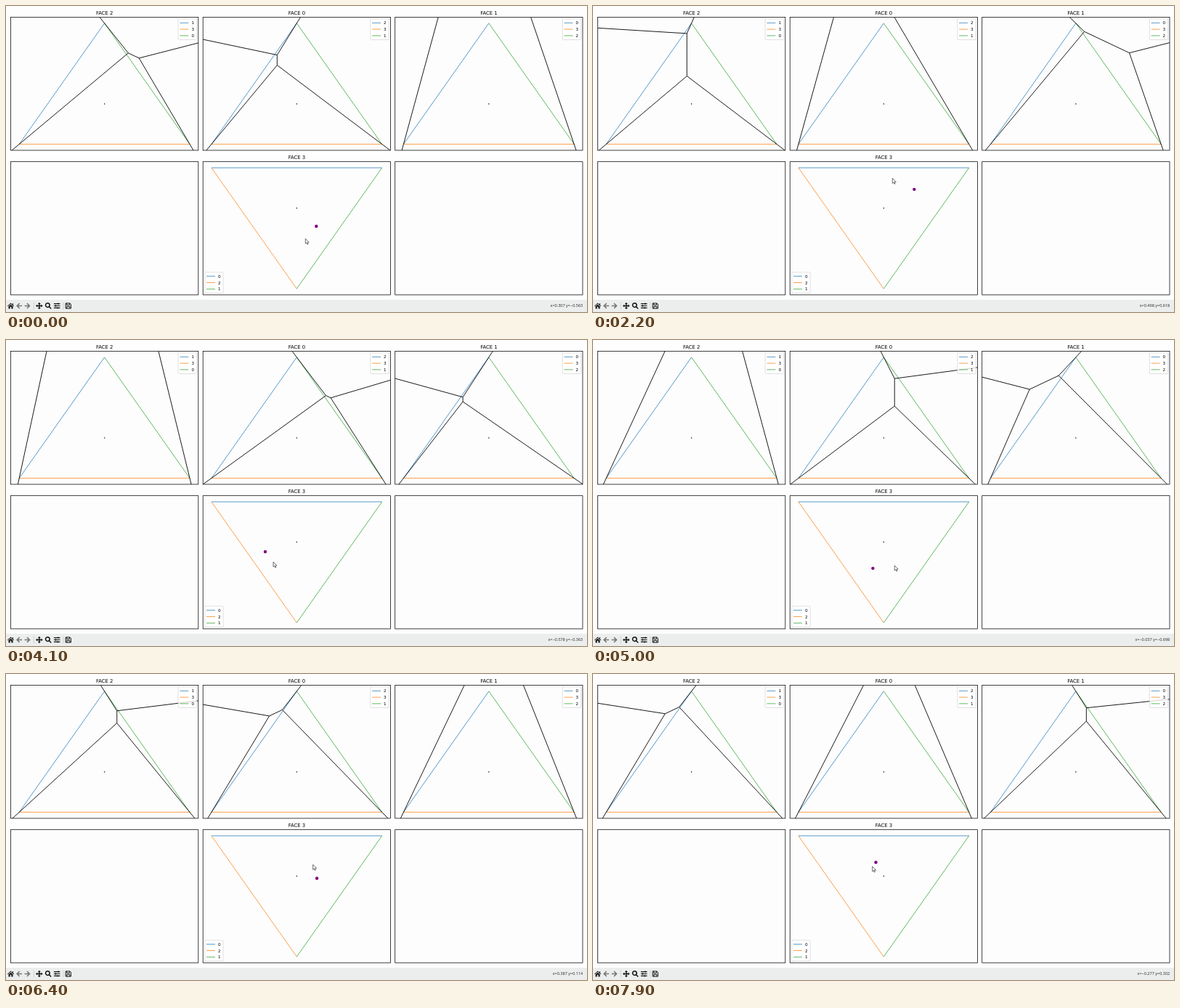
Animation, 800 px wide and 422 px high, one loop 8 s. Source, as an HTML page:

```html
<!DOCTYPE html>
<html lang="en">
<head>
<meta charset="utf-8">
<title>Cut locus on a tetrahedron</title>
<style>
html, body { margin: 0; width: 800px; height: 422px; overflow: hidden; background: #fefefe; }
svg { display: block; }
.title { font: 6.8px "DejaVu Sans", sans-serif; text-anchor: middle; }
.key { font: 5.6px "DejaVu Sans", sans-serif; }
.read { font: 5.5px "Open Sans", "Noto Sans", sans-serif; text-anchor: end; fill: #222; }
</style>
</head>
<body>
<svg id="stage" width="800" height="422" viewBox="0 0 800 422"></svg>
<script>
const LOOP = 8000, STEP = 50, READ_LAG = 200, MOUSE_LAG = 450;
const SX = 67.8, SY = 55.6, H = Math.sqrt(3);
const COLORS = ['#1f77b4', '#ff7f0e', '#2ca02c'];
const stage = document.getElementById('stage');

function add(tag, attrs, parent = stage, text) {
  const el = document.createElementNS('http://www.w3.org/2000/svg', tag);
  for (const k in attrs) el.setAttribute(k, attrs[k]);
  if (text !== undefined) el.textContent = text;
  parent.appendChild(el);
  return el;
}

// Pointer path: time, x, y in the units of the bottom face
const track = [
  [0, .398, -.45], [200, .307, -.563], [450, .177, -.757], [800, -.05, -.79],
  [1250, .214, -.63], [1450, .393, -.533], [1700, .664, .04],
  [2200, .62, .465], [2400, .498, .618], [2650, .177, .74],
  [3400, -.44, .555], [3600, -.602, .31], [3850, -.68, -.05],
  [5000, -.22, -.65], [5200, -.037, -.698], [5450, .22, -.58],
  [6400, .41, -.055], [6600, .387, .114], [6850, .33, .285],
  [7900, -.16, .34], [8100, -.277, .302], [8350, -.23, .24]
];
let turn = 0;
const polar = track.map(([t, x, y]) => {
  const a = Math.atan2(y, x);
  turn += Math.atan2(Math.sin(a - turn), Math.cos(a - turn));
  return [t, turn, Math.hypot(x, y)];
});

function slope(i, k) {
  const a = polar[Math.max(i - 1, 0)], b = polar[Math.min(i + 1, polar.length - 1)];
  return (b[k] - a[k]) / (b[0] - a[0]);
}

function pointAt(t) {
  let i = 0;
  while (i < polar.length - 2 && polar[i + 1][0] <= t) i++;
  const p = polar[i], q = polar[i + 1], d = q[0] - p[0];
  const u = Math.min((t - p[0]) / d, 1), v = 1 - u;
  const mix = k => p[k] * v * v * (1 + 2 * u) + q[k] * u * u * (3 - 2 * u)
    + d * u * v * (v * slope(i, k) - u * slope(i + 1, k));
  const a = mix(1), r = mix(2);
  return [r * Math.cos(a), r * Math.sin(a)];
}

// Unfolded copies of the dot as seen from a side face
function sites([px, py], rot) {
  const c = Math.cos(rot), s = Math.sin(rot);
  const x = px * c - py * s, y = px * s + py * c;
  const list = [[x, y - 2], [-2 * H - x, -y], [2 * H - x, -y]];
  const nearest = y > Math.abs(x) / H;
  if (!nearest) list.push([x + (x > 0 ? -2 : 2) * H, y + 4]);
  return list;
}

// Each bisector, cut by the half planes of the other sites
function voronoi(pts, cx, cy) {
  let d = '';
  pts.forEach(([ax, ay], i) => pts.slice(i + 1).forEach(([bx, by], n) => {
    const mx = (ax + bx) / 2, my = (ay + by) / 2;
    const len = Math.hypot(bx - ax, by - ay);
    const ux = (ay - by) / len, uy = (bx - ax) / len;
    let lo = -9, hi = 9;
    pts.forEach(([x, y], k) => {
      if (k === i || k === i + 1 + n) return;
      const gap = (x - mx) ** 2 + (y - my) ** 2 - (ax - mx) ** 2 - (ay - my) ** 2;
      const rate = 2 * ((x - mx) * ux + (y - my) * uy);
      if (rate > 0) hi = Math.min(hi, gap / rate);
      else if (rate < 0) lo = Math.max(lo, gap / rate);
      else if (gap < 0) hi = lo;
    });
    if (lo >= hi) return;
    const at = s => `${(cx + (mx + ux * s) * SX).toFixed(2)} ${(cy - (my + uy * s) * SY).toFixed(2)}`;
    d += `M${at(lo)}L${at(hi)}`;
  }));
  return d;
}

function axes(x, y) {
  add('rect', { x, y, width: 258.3, height: 183.5, fill: '#fdfdfe' });
}

function border(x, y) {
  add('rect', { x, y, width: 258.3, height: 183.5, fill: 'none', stroke: '#000', 'stroke-width': .75 });
}

function triangle(cx, cy, flip) {
  const at = (x, y) => `${cx + x * SX} ${cy - y * SY}`;
  const edges = flip
    ? [[-H, 1, H, 1], [-H, 1, 0, -2], [0, -2, H, 1]]
    : [[-H, -1, 0, 2], [-H, -1, H, -1], [0, 2, H, -1]];
  edges.forEach(([a, b, c, e], i) => add('path', {
    d: `M${at(a, b)}L${at(c, e)}`, stroke: COLORS[i], 'stroke-width': .75, fill: 'none'
  }));
  add('circle', { cx, cy, r: .75 });
}

function legend(x, y, names) {
  add('rect', { x, y, width: 25.4, height: 28.8, rx: 1.2, fill: '#fff', 'fill-opacity': .8, stroke: '#ccc', 'stroke-width': .6 });
  names.forEach((name, i) => {
    const ly = y + 5.6 + i * 8.8;
    add('path', { d: `M${x + 2.3} ${ly}h12`, stroke: COLORS[i], 'stroke-width': .75 });
    add('text', { x: x + 18.3, y: ly + 2.1, class: 'key' }, stage, name);
  });
}

const cols = [6.5, 271.2, 535.7], top1 = 15.5, top2 = 214.7;
const faces = [
  { name: 2, keys: [1, 3, 0], rot: -2 * Math.PI / 3 },
  { name: 0, keys: [2, 3, 1], rot: 0 },
  { name: 1, keys: [0, 3, 2], rot: 2 * Math.PI / 3 }
];
const CY = 135, CX3 = 400.3, CY3 = 278.7;

faces.forEach((f, i) => {
  const x = cols[i];
  f.cx = x + 129.1;
  axes(x, top1);
  const clip = add('clipPath', { id: 'clip' + i });
  add('rect', { x, y: top1, width: 258.3, height: 183.5 }, clip);
  triangle(f.cx, CY, false);
  f.path = add('path', { fill: 'none', stroke: '#000', 'stroke-width': .9, 'clip-path': `url(#clip${i})` });
  border(x, top1);
  legend(x + 230.6, 17.7, f.keys);
  add('text', { x: f.cx, y: 12.2, class: 'title' }, stage, 'FACE ' + f.name);
});
cols.forEach(x => { axes(x, top2); border(x, top2); });
triangle(CX3, CY3, true);
legend(cols[1] + 2.5, 367.1, [0, 2, 1]);
add('text', { x: CX3, y: 211.4, class: 'title' }, stage, 'FACE 3');
const dot = add('circle', { r: 2.2, fill: '#800080' });

// Toolbar
add('rect', { x: 0, y: 405, width: 800, height: 17, fill: '#eceeed' });
const icon = (x, d, attrs) => add('path', { d, transform: `translate(${x} 413.5)`, fill: '#111', ...attrs });
const line = { fill: 'none', stroke: '#111', 'stroke-width': 1.2 };
icon(6.5, 'M-4.6 .2L0-4 2.4-1.8V-3.5H3.4V-.9L4.6 .2 4 .8 0-2.7-4 .8ZM-3 .8L0-1.8 3 .8V4H.9V1.3H-.9V4H-3Z');
const arrow = 'M-4 0L.1-4 1.2-2.9-.9-.8H4V.8H-.9L1.2 2.9 .1 4Z';
icon(18, arrow, { fill: '#777' });
icon(29.6, arrow, { fill: '#777', transform: 'translate(29.6 413.5) scale(-1 1)' });
icon(38.3, 'M0-5V5', { stroke: '#c4c6c5', 'stroke-width': .7 });
icon(45.8, 'M0-4.8L2-2.6H.7V-.7H2.6V-2L4.8 0 2.6 2V.7H.7V2.6H2L0 4.8-2 2.6H-.7V.7H-2.6V2L-4.8 0-2.6-2V-.7H-.7V-2.6H-2Z');
icon(58.2, 'M-3.7-.9a2.8 2.8 0 1 0 5.6 0a2.8 2.8 0 1 0-5.6 0M1.2 1.2L4 4', { ...line, 'stroke-width': 1.5 });
icon(70.2, 'M-4.3-2.9H4.3M-4.3 0H4.3M-4.3 2.9H4.3M1.8-4.1V-1.7M-1.8-1.2V1.2M.9 1.7V4.1', line);
icon(79, 'M0-5V5', { stroke: '#c4c6c5', 'stroke-width': .7 });
icon(85.8, 'M-3.6-3.6H2.2L3.6-2.2V3.6H-3.6ZM-2-3.4V-1H1.6V-3.4M-2 3.4V1H2V3.4', { ...line, 'stroke-width': 1 });
const read = add('text', { x: 794.2, y: 415.3, class: 'read' });

const cursor = add('path', {
  d: 'M0 0V7L1.6 5.6 2.7 8 3.8 7.5 2.7 5.1H4.9Z',
  fill: '#fff', stroke: '#333', 'stroke-width': .7
});

const num = v => v.toFixed(3).replace('-', '\u2212');

function draw(time) {
  const t = Math.floor(time % LOOP / STEP) * STEP;
  const p = pointAt(t), r = pointAt(t + READ_LAG), m = pointAt(t + MOUSE_LAG);
  faces.forEach(f => f.path.setAttribute('d', voronoi(sites(p, f.rot), f.cx, CY)));
  dot.setAttribute('cx', CX3 + p[0] * SX);
  dot.setAttribute('cy', CY3 - p[1] * SY);
  cursor.setAttribute('transform', `translate(${CX3 + m[0] * SX} ${CY3 - m[1] * SY})`);
  read.textContent = `x=${num(r[0])} y=${num(r[1])}`;
}

const start = performance.now();
function tick() {
  draw(performance.now() - start);
  requestAnimationFrame(tick);
}
tick();
</script>
</body>
</html>
```
